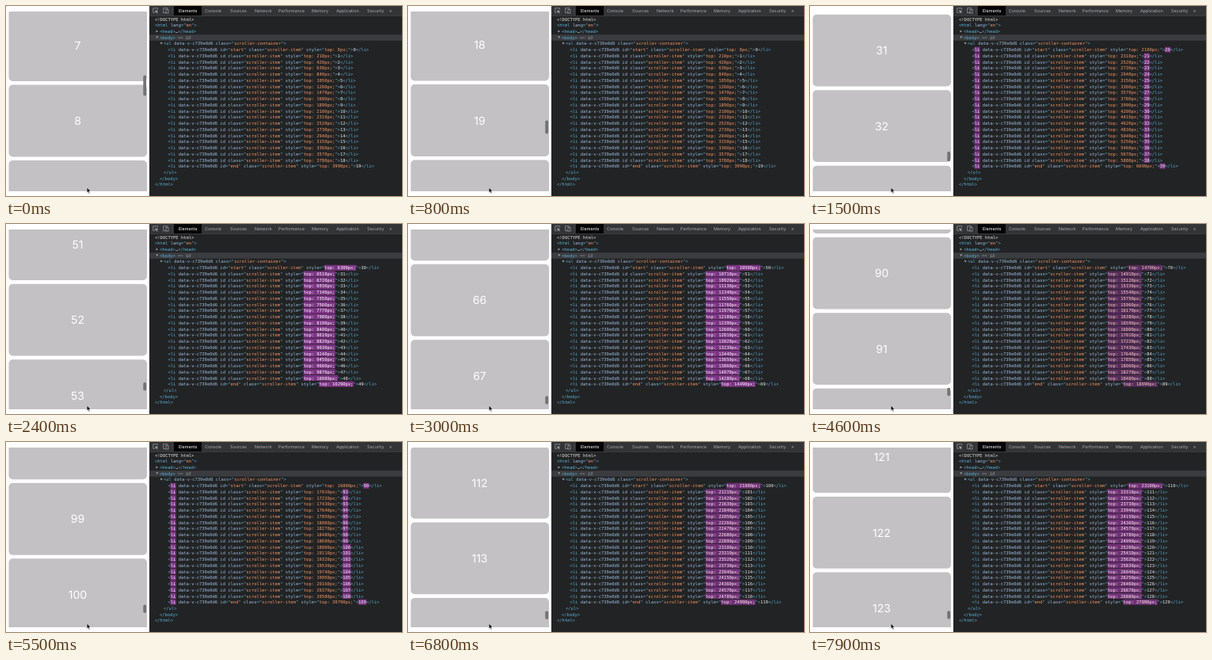
Write an HTML page that moves like this. It is 500 px wide and 240 px high and loops after 8000 ms.

```html
<!DOCTYPE html>
<html lang="en">
<head>
<meta charset="utf-8">
<title>Recycled list scroller</title>
<style>
  html, body { margin: 0; width: 100%; height: 100%; overflow: hidden; background: #fff; }
  svg { display: block; width: 500px; height: 240px; }
  text { white-space: pre; text-rendering: geometricPrecision; }
  .code text { font: 5.473px "DejaVu Sans Mono", monospace; fill: #5db0d7; }
  .tabs text { font: 5.4px Inter, sans-serif; fill: #a9adb1; }
  .items text { font: 14px Inter, sans-serif; fill: #fff; text-anchor: middle; }
  .code .name { fill: #9bbbdc; }
  .code .value { fill: #f29766; }
  .code .plain { fill: #e4e4e4; }
  .code .dim { fill: #8c8f93; }
</style>
</head>
<body>
<svg viewBox="0 0 500 240" xmlns="http://www.w3.org/2000/svg">
  <defs><clipPath id="view"><rect x="0" y="7" width="181" height="227"/></clipPath></defs>
  <rect width="181" height="240" fill="#fff"/>
  <g class="items" id="items" clip-path="url(#view)"></g>
  <rect id="thumb" x="173.3" width="3.8" rx="1.9" fill="#737274"/>
  <path d="M102.2 229.3v6.6l1.5-1.4 1.1 2.4 1.1-.5-1.1-2.3h2.1z" fill="#000" stroke="#fff" stroke-width=".5"/>

  <rect x="181" width="319" height="240" fill="#222324"/>
  <g class="tabs" id="tabs">
    <rect x="181" width="319" height="12.3" fill="#333436"/>
    <rect x="181" y="12" width="319" height=".6" fill="#48494b"/>
    <rect x="212" width="35" height="12" fill="#050505"/>
    <rect x="209.6" y="2.5" width=".6" height="7" fill="#55575a"/>
    <g fill="none" stroke="#a0a4a8" stroke-width=".7">
      <path d="M188 8.3h-2.2v-5.6h5.8v2"/>
      <path d="M188.3 5l4 1.5-1.8.7 1.5 1.8-.6.5-1.5-1.8-.8 1.5z" fill="#a0a4a8" stroke="none"/>
      <path d="M202 8.6h-3.3v-6h5v1.2"/>
      <rect x="202" y="4.4" width="3" height="4.6"/>
    </g>
  </g>
  <g class="code" id="code">
    <rect x="181" y="36.1" width="319" height="7.6" fill="#3a3c40"/>
  </g>
</svg>
<script>
const NS = "http://www.w3.org/2000/svg";
const $ = id => document.getElementById(id);
function add(parent, tag, attrs = {}, text = "") {
  const el = document.createElementNS(NS, tag);
  for (const key in attrs) el.setAttribute(key, attrs[key]);
  if (text) el.textContent = text;
  parent.appendChild(el);
  return el;
}

const LOOP = 8000, STEP = 100;
const CHAR = 3.295, LINE = 7.74, PITCH = 95.5;
const code = $("code");
const lineY = row => 16.5 + row * LINE;

// Tabs
[["Elements", 218], ["Console", 251], ["Sources", 283], ["Network", 314], ["Performance", 344],
 ["Memory", 386], ["Application", 417], ["Security", 456], ["»", 484]].forEach(([label, x], i) => {
  const tab = add($("tabs"), "text", { x, y: 7.9 }, label);
  if (i === 0) tab.style.fill = "#fff";
});

// Static markup lines: parts are [text, class]
function line(row, x, parts) {
  const text = add(code, "text", { x, y: lineY(row) + 2 });
  return parts.map(([str, cls]) => add(text, "tspan", cls ? { class: cls } : {}, str));
}
function arrow(row, x, open) {
  const d = open ? "h3l-1.5 2.6z" : "l2.6 1.5-2.6 1.5z";
  add(code, "path", { d: `M${x} ${lineY(row) - 1.4}${d}`, fill: "#9a9da1" });
}
const scope = ["data-v-c739e0d6", "name"];
line(0, 188, [["<!DOCTYPE html>", "plain"]]);
line(1, 188, [["<html "], ["lang", "name"], ["=\""], ["en", "value"], ["\">"]]);
arrow(2, 189.5, false);
line(2, 194, [["<head>"], ["…", "plain"], ["</head>"]]);
arrow(3, 189.3, true);
line(3, 194, [["<body>"], [" == $0", "dim"]])[1].setAttribute("font-style", "italic");
arrow(4, 194.6, true);
line(4, 199, [["<ul "], scope, [" class", "name"], ["=\""], ["scroller-container", "value"], ["\">"]]);
line(25, 199, [["</ul>"]]);
line(26, 194, [["</body>"]]);
line(27, 188, [["</html>"]]);

// List rows, each with flash boxes behind the parts that change
const LI_X = 204.5;
const rows = Array.from({ length: 20 }, (_, i) => {
  const row = 5 + i;
  const id = i === 0 ? "start" : i === 19 ? "end" : "";
  const box = () => add(code, "rect", { y: lineY(row) - 3.5, height: 7, rx: .8, fill: "#7c3384" });
  const boxes = { tag: box(), top: box(), num: box() };
  const idParts = id ? [["=\""], [id, "value"], ["\""]] : [];
  const spans = line(row, LI_X, [
    ["<"], ["li"], [" "], scope, [" id", "name"], ...idParts,
    [" class", "name"], ["=\""], ["scroller-item", "value"], ["\""],
    [" style", "name"], ["=\""], ["0", "value"], ["\">"], ["0", "plain"], ["</li>"]
  ]);
  const n = spans.length;
  const topCol = 20 + (id ? id.length + 6 : 3) + 22 + 7;
  return { boxes, topCol, tag: spans[1], top: spans[n - 4], num: spans[n - 2] };
});

function mix(a, b, k) {
  return `rgb(${a.map((v, i) => Math.round(v + (b[i] - v) * k))})`;
}
const WHITE = [255, 255, 255], BLUE = [93, 176, 215], ORANGE = [242, 151, 102];

function place(box, col, len, alpha) {
  box.setAttribute("x", LI_X + col * CHAR - .4);
  box.setAttribute("width", len * CHAR + .8);
  box.setAttribute("opacity", alpha);
}

// Each batch of ten renames its rows first and moves them shortly after
const BATCHES = [1000, 1400, 2200, 2500, 2800, 3100, 3800, 4700, 5500, 6400, 7500];
const MOVE_LAG = 200, FADE = 1400;

function drawList(t) {
  const named = BATCHES.filter(b => b <= t).length;
  const moved = BATCHES.filter(b => b + MOVE_LAG <= t).length;
  const naming = named > moved;
  const since = naming ? t - BATCHES[named - 1] : moved ? t - BATCHES[moved - 1] - MOVE_LAG : FADE;
  const glow = Math.max(0, 1 - since / FADE);
  const nameGlow = naming ? glow : 0, moveGlow = naming ? 0 : glow;
  rows.forEach((r, i) => {
    const top = `top: ${(moved * 10 + i) * 210}px;`, num = String(named * 10 + i);
    r.top.textContent = top;
    r.num.textContent = num;
    r.tag.style.fill = mix(BLUE, WHITE, nameGlow);
    r.top.style.fill = mix(ORANGE, WHITE, moveGlow);
    place(r.boxes.tag, 1, 2, nameGlow);
    place(r.boxes.top, r.topCol, top.length, moveGlow);
    place(r.boxes.num, r.topCol + top.length + 2, num.length, nameGlow);
  });
}

// Scroll position in items, by monotone cubic through [seconds, position]
const PATH = [[0, 8], [1.5, 31.93], [2.4, 52.25], [3.7, 80.55], [5.5, 99.5], [6.8, 112.98], [7.9, 122.32]];
const rate = PATH.slice(1).map(([s, p], i) => (p - PATH[i][1]) / (s - PATH[i][0]));
const slope = PATH.map((_, i) => {
  if (i === 0) return 9;
  if (i === rate.length) return rate[i - 1];
  return 2 * rate[i - 1] * rate[i] / (rate[i - 1] + rate[i]);
});
function position(s) {
  let i = 0;
  while (i < rate.length - 1 && s > PATH[i + 1][0]) i++;
  const [s0, p0] = PATH[i], [s1, p1] = PATH[i + 1];
  const h = s1 - s0, u = (s - s0) / h, v = 1 - u;
  return p0 * (1 + 2 * u) * v * v + slope[i] * h * u * v * v
       + p1 * u * u * (3 - 2 * u) - slope[i + 1] * h * u * u * v;
}

const cards = Array.from({ length: 4 }, () => {
  const g = add($("items"), "g");
  add(g, "rect", { x: 3.5, y: -45.4, width: 174.5, height: 90.8, rx: 5, fill: "#c3c1c3" });
  return { g, label: add(g, "text", { x: 90.5, y: 5.1 }) };
});

function drawScroller(t) {
  const pos = position(t / 1000);
  const first = Math.floor(pos) - 1;
  cards.forEach((card, i) => {
    card.label.textContent = first + i;
    card.g.setAttribute("transform", `translate(0 ${145 + (first + i - pos) * PITCH})`);
  });
  const shown = 227 / PITCH;
  const total = 20 + 10 * Math.max(0, Math.floor((pos - 8.5) / 10));
  const size = Math.max(10.5, 227 * shown / total - 1);
  $("thumb").setAttribute("height", size);
  $("thumb").setAttribute("y", 7.3 + (227 - size) * (pos - .967) / (total - shown));
}

function frame() {
  const t = Math.floor(performance.now() % LOOP / STEP) * STEP;
  drawScroller(t);
  drawList(t);
  requestAnimationFrame(frame);
}
frame();
</script>
</body>
</html>
```
